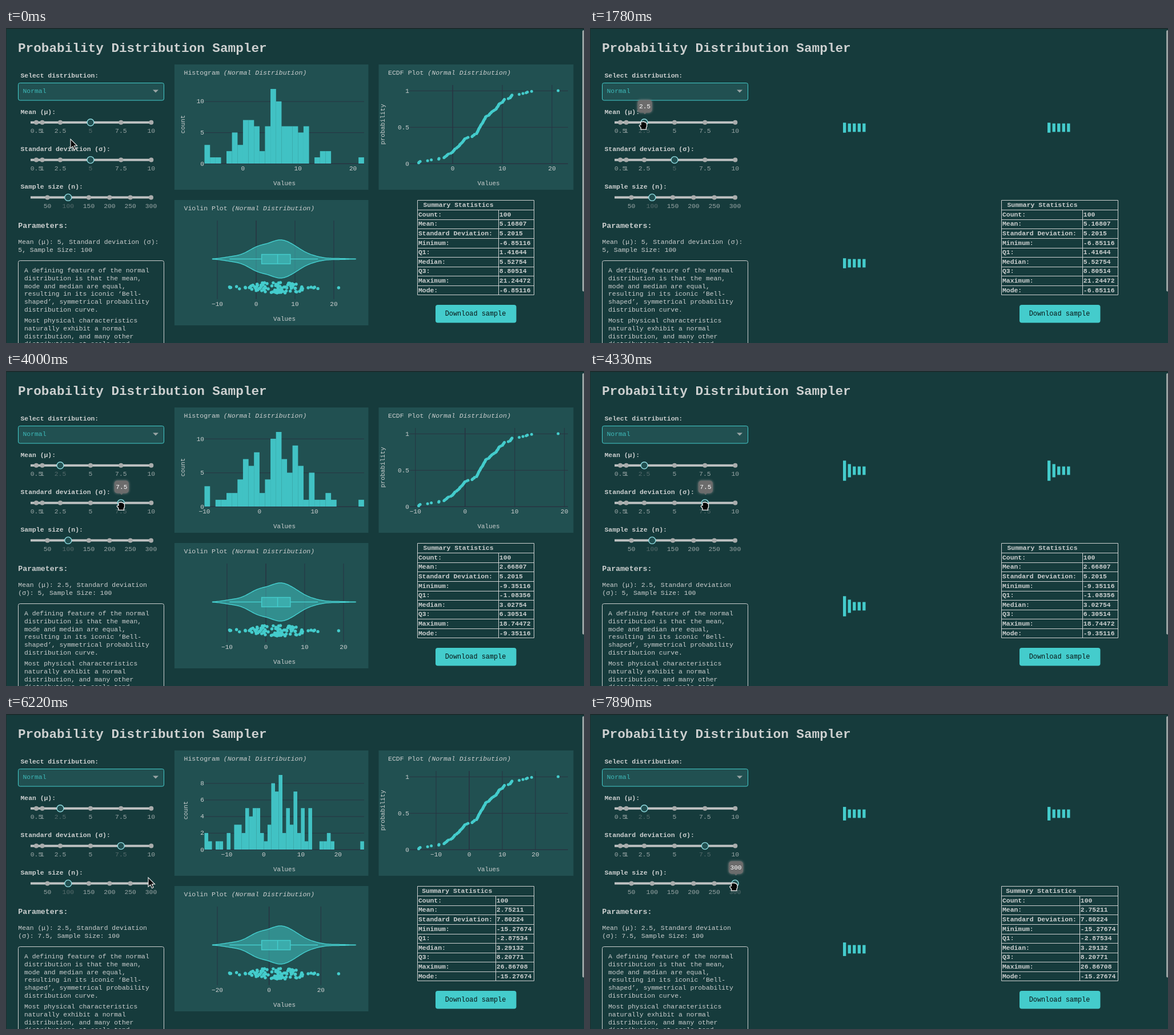
Recreate the animation shown at these times as an HTML page with a canvas. Size 1012 px wide and 553 px high, loop 8 s.

```html
<!DOCTYPE html>
<html lang="en">
<head>
<meta charset="utf-8">
<title>Probability Distribution Sampler</title>
<style>
  html, body { margin: 0; width: 100%; height: 100%; overflow: hidden; background: #163b3c; }
  canvas { display: block; }
</style>
</head>
<body>
<canvas id="stage" width="1012" height="553"></canvas>
<script>
const ctx = document.getElementById('stage').getContext('2d');
const LOOP = 8000, TICKS_PER_MS = 9 / 1000;
const BG = '#163b3c', PANEL = '#215051', TEAL = '#44cccc', BAR = '#41c2c4',
      INK = '#cdd0d0', GRID = '#283442', MUTED = '#98a5a5', DIM = '#566b6c';

// Sorted sample drawn with mean 5 and standard deviation 5.
const sample = [
  -6.85, -6.75, -6.55, -5.05, -4.3, -2.8, -2.75, -1.75, -1.6, -1.4, -1.2, -1.1, -.85, -.4, -.15,
  .02, .12, .25, .35, .45, .75, .9, 1.1, 1.25, 1.4, 1.43, 1.6, 1.75, 1.9,
  2.05, 2.15, 2.25, 2.35, 2.45, 2.8, 3.1, 3.9, 4.05, 4.3, 4.4, 4.8, 4.87, 4.95,
  5.03, 5.1, 5.17, 5.23, 5.3, 5.38, 5.49, 5.56, 5.62, 5.7, 5.8, 5.95,
  6.05, 6.1, 6.18, 6.25, 6.33, 6.42, 6.53, 6.58, 6.63, 6.85, 7.2, 7.38, 7.45, 7.6, 7.75, 7.9,
  8.15, 8.35, 8.6, 8.78, 8.83, 8.92, 9.05, 9.15, 9.22, 9.3, 9.42, 9.7,
  10.02, 10.1, 10.2, 10.3, 10.42, 11.2, 11.55, 11.65, 11.75, 11.85, 11.95,
  13.4, 14.15, 14.8, 15.05, 15.9, 21.24];
const MIN = sample[0], SPAN = sample[99] - MIN;

const states = [
  { mean: 5, sd: 5, yStep: 5, xStep: 10, countX: 310, column: 862,
    params: ['Mean (μ): 5, Standard deviation (σ):', '5, Sample Size: 100'],
    stats: ['100', '5.16807', '5.2015', '-6.85116', '1.41644', '5.52754', '8.80514', '21.24472', '-6.85116'] },
  { mean: 2.5, sd: 5, yStep: 5, xStep: 10, countX: 310, column: 862,
    params: ['Mean (μ): 2.5, Standard deviation', '(σ): 5, Sample Size: 100'],
    stats: ['100', '2.66807', '5.2015', '-9.35116', '-1.08356', '3.02754', '6.30514', '18.74472', '-9.35116'] },
  { mean: 2.5, sd: 7.5, yStep: 2, xStep: 20, countX: 315, column: 857.5,
    params: ['Mean (μ): 2.5, Standard deviation', '(σ): 7.5, Sample Size: 100'],
    stats: ['100', '2.75211', '7.80224', '-15.27674', '-2.87534', '3.29132', '8.20771', '26.86708', '-15.27674'] }];
const statNames = ['Count:', 'Mean:', 'Standard Deviation:', 'Minimum:', 'Q1:', 'Median:', 'Q3:', 'Maximum:', 'Mode:'];
for (const s of states) {
  s.scale = v => s.mean + (v - 5) * s.sd / 5;
  s.lo = Math.floor(s.scale(MIN));
  s.bins = Array(Math.floor(s.scale(sample[99])) - s.lo + 1).fill(0);
  for (const v of sample) s.bins[Math.floor(s.scale(v)) - s.lo]++;
}

// Kernel density, scaled to a peak of 1.
const BANDWIDTH = 2.19;
const kde = x => sample.reduce((sum, v) => sum + Math.exp(-(((x - v) / BANDWIDTH) ** 2) / 2), 0);
const outline = Array.from({ length: 121 }, (_, i) => {
  const x = MIN - 2 * BANDWIDTH + (SPAN + 4 * BANDWIDTH) * i / 120;
  return [x, kde(x)];
});
const peak = Math.max(...outline.map(p => p[1]));
let seed = 11;
const random = () => (seed = seed * 16807 % 2147483647) / 2147483647;
const strip = sample.map(v => [v, (random() * 2 - 1) * 9 * Math.min(1, 1.3 * kde(v) / peak)]);

function text(str, x, y, { color = INK, size = 11.4, style = '', align = 'left' } = {}) {
  ctx.font = `${style} ${size}px "Liberation Mono", monospace`;
  ctx.fillStyle = color;
  ctx.textAlign = align;
  ctx.fillText(str, x, y);
  return ctx.measureText(str).width;
}
function rect(x, y, w, h, color) {
  ctx.fillStyle = color;
  ctx.fillRect(x, y, w, h);
}
function box(x, y, w, h, r, fill, stroke) {
  ctx.beginPath();
  ctx.roundRect(x, y, w, h, r);
  if (fill) { ctx.fillStyle = fill; ctx.fill(); }
  if (stroke) { ctx.strokeStyle = stroke; ctx.lineWidth = 1; ctx.stroke(); }
}
function line(x1, y1, x2, y2, color = GRID, width = 1) {
  ctx.beginPath();
  ctx.moveTo(x1, y1);
  ctx.lineTo(x2, y2);
  ctx.strokeStyle = color;
  ctx.lineWidth = width;
  ctx.stroke();
}
function triangle(x, y, halfWidth, height, color) {
  ctx.beginPath();
  ctx.moveTo(x - halfWidth, y);
  ctx.lineTo(x + halfWidth, y);
  ctx.lineTo(x, y + height);
  ctx.fillStyle = color;
  ctx.fill();
}
function dot(x, y, r, color) {
  ctx.beginPath();
  ctx.arc(x, y, r, 0, 7);
  ctx.fillStyle = color;
  ctx.fill();
}
function sideways(str, x, y) {
  ctx.save();
  ctx.translate(x, y);
  ctx.rotate(-Math.PI / 2);
  text(str, 0, 3, { size: 10.8, align: 'center' });
  ctx.restore();
}
function panel(x, y, title) {
  rect(x, y, x < 600 ? 339.5 : 341, 220, PANEL);
  const w = text(title + ' ', x + 16.5, y + 18, { size: 11.55 });
  text('(Normal Distribution)', x + 16.5 + w, y + 18, { size: 11.55, style: 'italic' });
  text('Values', x + 192.5, y + 212, { size: 10.8, align: 'center' });
}
function xAxis(toX, step, left, right, labelY, top, bottom) {
  for (let v = -40; v <= 40; v += step) {
    const x = toX(v);
    if (x < left || x > right) continue;
    if (top) line(x, top, x, bottom, GRID, v ? 1 : 1.5);
    text(String(v).replace('-', '−'), x, labelY, { size: 11.1, align: 'center' });
  }
}
function yTick(label, left, right, y) {
  line(left, y + .3, right, y + .3, GRID, label ? 1 : 1.5);
  text(label, left - .5, Math.round(y + 3.6), { size: 11.1, align: 'right' });
}

function histogram(s) {
  panel(295, 64, 'Histogram');
  const max = Math.max(...s.bins), w = 279.3 / s.bins.length, unit = 131 / max;
  for (let n = 0; n <= max; n += s.yStep) yTick(n, 347.5, 627, 238 - n * unit);
  s.bins.forEach((n, i) => rect(347.5 + i * w, 238 - n * unit, w + (n ? .1 : 0), n * unit, BAR));
  xAxis(v => 347.5 + (v - s.lo) * w, 10, 347, 627.5, 250);
  sideways('count', s.countX, 169);
}
function ecdf(s) {
  panel(652.5, 64, 'ECDF Plot');
  const min = s.scale(MIN), unit = 244.2 / (s.scale(sample[99]) - min);
  xAxis(v => 722.5 + (v - min) * unit, 10, 707, 984, 250, 100, 238);
  for (const p of [0, .5, 1]) yTick(p, 706.5, 984, 238 - p * 128);
  sample.forEach((v, i) => dot(722.5 + (v - MIN) / SPAN * 244.2, 238 - (i + 1) * 1.28, 2.5, TEAL));
  sideways('probability', 660, 169);
}
function violin(s) {
  panel(295, 302, 'Violin Plot');
  const toX = v => 391.4 + (v - MIN) / SPAN * 191, mid = 405.5;
  xAxis(v => toX(5 + (v - s.mean) * 5 / s.sd), s.xStep, 348, 627, 488, 338, 476);
  ctx.beginPath();
  for (const [x, d] of outline) ctx.lineTo(toX(x), mid - d / peak * 33.5);
  for (const [x, d] of [...outline].reverse()) ctx.lineTo(toX(x), mid + d / peak * 33.5);
  ctx.closePath();
  ctx.fillStyle = TEAL + '80';
  ctx.fill();
  ctx.strokeStyle = TEAL;
  ctx.lineWidth = 1.5;
  ctx.stroke();
  const [q1, median, q3] = [1.416, 5.528, 8.805].map(toX);
  rect(q1, 397.5, q3 - q1, 16.5, TEAL + '80');
  ctx.strokeRect(q1, 397.5, q3 - q1, 16.5);
  line(median, 397.5, median, 414, TEAL, 1.5);
  line(toX(MIN), mid, q1, mid, TEAL, 1.5);
  line(q3, mid, toX(15.9), mid, TEAL, 1.5);
  for (const [v, dy] of strip) dot(toX(v), 456 + dy, 2.7, TEAL);
}
function loader(x, y, age) {
  for (let i = 0; i < 5; i++) {
    const p = Math.max(0, 1 - Math.abs((age - i * 100) / 240 - 1));
    const h = 37 * (.4 + .6 * p * p * (3 - 2 * p));
    rect(x + i * 8.55, y - h / 2, 5.3, h, TEAL);
  }
}

function slider(y, label, values, xs, value) {
  text(label, 25.5, Math.round(y - 14.7), { style: 'bold' });
  rect(43, y - 1.5, 212, 4, '#bfc2c2');
  xs.forEach(x => dot(x, y + .5, 4, '#a9acac'));
  values.forEach((v, i) =>
    text(v, xs[i], Math.round(y + 19), { color: v === value ? DIM : MUTED, align: 'center' }));
  ctx.beginPath();
  ctx.arc(xs[values.indexOf(value)], y + .5, 6, 0, 7);
  ctx.fillStyle = PANEL;
  ctx.fill();
  ctx.strokeStyle = '#8fdbe0';
  ctx.lineWidth = 1.4;
  ctx.stroke();
}
function tooltip(x, y, value) {
  ctx.save();
  ctx.shadowColor = '#8a8a8a';
  ctx.shadowBlur = 4;
  box(x - 12.5, y - 11, 25, 22, 5, '#6c6c6c');
  ctx.restore();
  triangle(x, y + 11, 3, 3, '#6c6c6c');
  text(value, x, Math.round(y + 3.5), { color: '#fff', align: 'center', size: 11.2 });
}
function sidebar(s, tick) {
  text('Select distribution:', 25.5, 87, { style: 'bold' });
  box(21.5, 96.5, 255, 30.5, 3, PANEL, TEAL);
  text('Normal', 29.5, 114, { color: '#3db9b9' });
  triangle(262, 108.5, 5, 5, '#9aa5a5');

  const steps = ['0.5', '1', '2.5', '5', '7.5', '10'], stepX = [53, 63.5, 95, 148, 201.3, 254.3];
  slider(165.3, 'Mean (μ):', steps, stepX, tick < 14 ? '5' : '2.5');
  slider(231.1, 'Standard deviation (σ):', steps, stepX, tick < 36 ? '5' : '7.5');
  slider(296.9, 'Sample size (n):', ['50', '100', '150', '200', '250', '300'],
    [72.5, 108.8, 145, 181.4, 217.7, 254], tick < 69 ? '100' : '300');

  text('Parameters:', 21.3, 351, { size: 13.2, style: 'bold' });
  s.params.forEach((row, i) => text(row, 21.3, 379 + i * 14));
  box(21.5, 408.5, 255, 200, 3, null, INK);
  ['A defining feature of the normal', 'distribution is that the mean,', 'mode and median are equal,',
   'resulting in its iconic ‘Bell-', 'shaped’, symmetrical probability', 'distribution curve.']
    .forEach((row, i) => text(row, 32, 429 + i * 13.75));
  ['Most physical characteristics', 'naturally exhibit a normal', 'distribution, and many other',
   'distributions at scale tend']
    .forEach((row, i) => text(row, 32, 517 + i * 13.75));
}
function table(s) {
  const top = 302.6, row = 16.6, bold = { style: 'bold' };
  box(720.5, 302.5, 204, 166, 0, null, INK);
  text('Summary Statistics', (721 + s.column) / 2 + .5, 314, { style: 'bold', align: 'center' });
  const x = Math.floor(s.column) + .5;
  line(x, top + row, x, top + row * 10, INK);
  statNames.forEach((name, i) => {
    const rowTop = top + row * (i + 1), y = Math.round(rowTop) + .5, baseline = Math.round(rowTop + 11.6);
    line(720.5, y, 924.5, y, INK);
    text(name, 722, baseline, bold);
    text(s.stats[i], x + 1.3, baseline, bold);
  });
}

// Pointer moves: first tick, number of steps, end point.
const moves = [[4, 5, 101, 165], [10, 3, 90, 164], [22, 3, 162, 201], [27, 6, 200, 227],
               [51, 6, 249, 287], [57, 2, 250.5, 287.5], [60, 3, 253, 302]];
function arrow(tick) {
  let x = 113, y = 195;
  for (const [start, steps, toX, toY] of moves) {
    const p = Math.max(0, Math.min(1, (tick - start + 1) / steps));
    x += (toX - x) * p;
    y += (toY - y) * p;
  }
  ctx.save();
  ctx.translate(x, y);
  const shape = new Path2D('M0 0V16.2L3.8 12.8L6.6 18.8L9.2 17.6L6.5 11.8H11.6Z');
  ctx.fillStyle = '#0b0b0b';
  ctx.fill(shape);
  ctx.strokeStyle = '#eee';
  ctx.lineWidth = 1.1;
  ctx.stroke(shape);
  ctx.restore();
}
function fist(x, y) {
  ctx.save();
  ctx.translate(x, y);
  const shape = new Path2D('M-4-4.5Q-3-7-1.2-5.6Q.6-7 2.2-5.2Q4-6 4.8-4Q6.6-4 6.5-1.5V2.5L5.4 4.5V7.6H-4V4.5L-6.6 1.5Q-7-.8-4-.5Z');
  ctx.fillStyle = '#050505';
  ctx.fill(shape);
  ctx.strokeStyle = '#f4f4f4';
  ctx.lineWidth = 1.3;
  ctx.stroke(shape);
  ctx.restore();
}

// The scrollbar fades while the pointer rests and returns when it moves.
function scrollbar(tick) {
  ctx.globalAlpha = tick < 42 || tick > 50 ? 1 : Math.max(0, 1 - (tick - 41) / 4);
  box(1009, 4, 5, 458.5, 2, '#98a2a2');
  ctx.globalAlpha = 1;
}

function draw(now) {
  const tick = Math.floor((now % LOOP + 6) * TICKS_PER_MS) % 72, time = tick / TICKS_PER_MS;
  const s = states[tick < 18 ? 0 : tick < 40 ? 1 : 2];
  const loading = [[1725, 18], [4133, 40], [7784, 72]].find(([start, end]) => time >= start && tick < end);

  rect(0, 0, 1012, 553, BG);
  rect(0, 0, 1012, 1.5, '#1d2728');
  rect(0, 0, 1, 553, '#1f2e2f');
  scrollbar(tick);
  text('Probability Distribution Sampler', 21, 42, { size: 22.7, style: 'bold' });
  sidebar(s, tick);

  if (loading) {
    for (const [x, y] of [[443, 175], [801, 175], [443, 413]]) loader(x, y, time - loading[0]);
  } else {
    histogram(s);
    ecdf(s);
    violin(s);
  }
  table(s);
  box(752, 486, 141.5, 31.5, 4, TEAL);
  text('Download sample', 822, 505, { color: '#081414', size: 11.85, align: 'center' });

  if (tick >= 14 && tick < 23) tooltip(96, 137.5, '2.5');
  if (tick >= 36 && tick < 52) tooltip(202.3, 203.5, '7.5');
  if (tick >= 69) tooltip(255.5, 269.5, '300');
  if (tick >= 14 && tick < 22) fist(93, 170.5);
  else if (tick >= 36 && tick < 51) fist(201, 236.5);
  else if (tick >= 67) fist(251.5, 302.5);
  else arrow(tick);
}

const started = performance.now();
function loop() {
  draw(performance.now() - started);
  requestAnimationFrame(loop);
}
loop();
</script>
</body>
</html>
```
